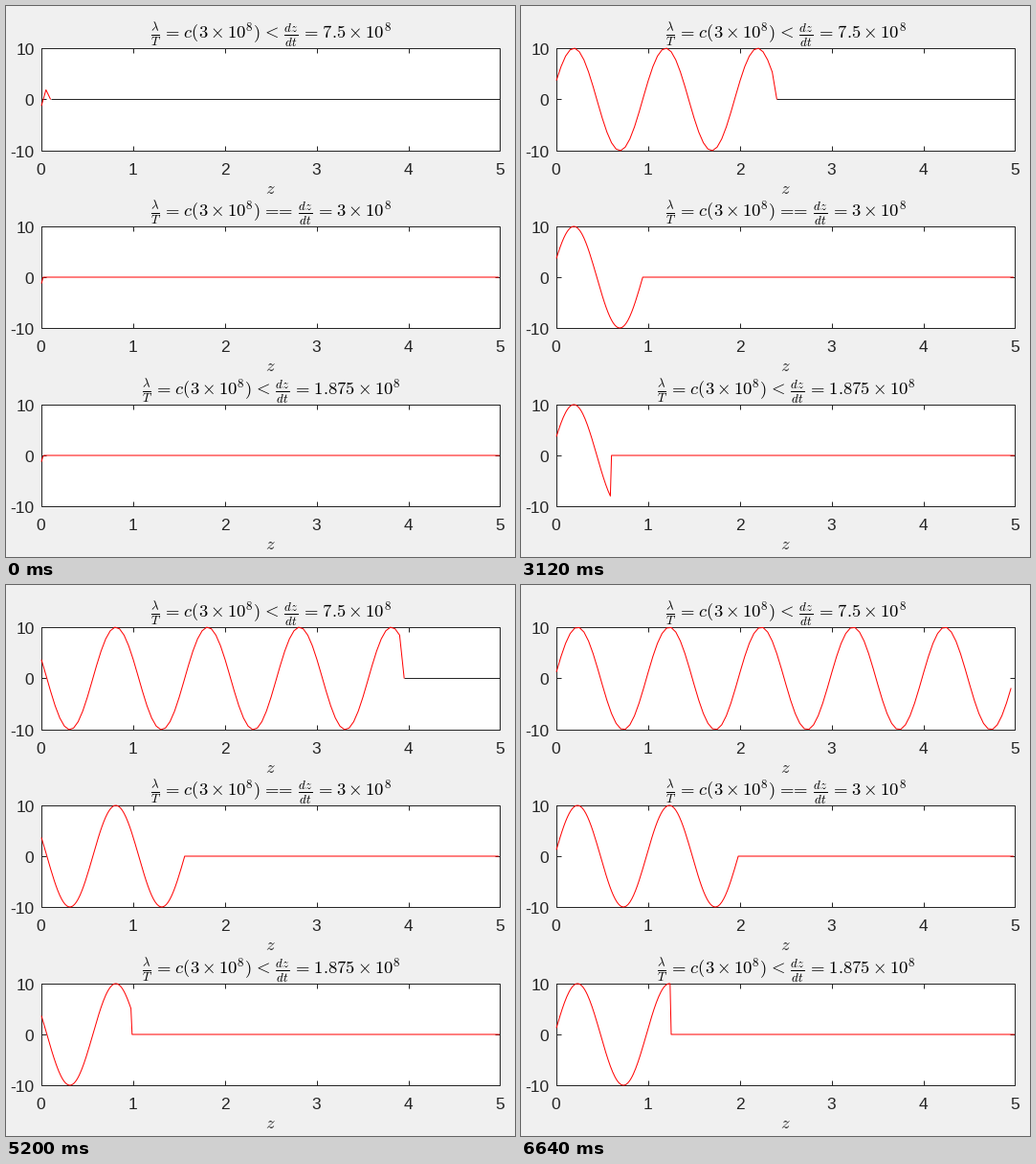
These frames come from a looping animation (532x575 px, 7.2 s). A matplotlib script:

```python
import numpy as np
import matplotlib.pyplot as plt
from matplotlib.animation import FuncAnimation

W, H, DPI = 532, 575, 100
TICK, FRAMES = 40, 180          # ms per frame, frames per loop
X0, UNIT = 37, 96               # pixel of z = 0, pixels per unit of z
LEFT, RIGHT = 37, 516
INK = (0.15, 0.15, 0.15)
PX = 72 / DPI                   # points per pixel

plt.rcParams["mathtext.fontset"] = "cm"
plt.rcParams["font.family"] = "Liberation Sans"

fig = plt.figure(figsize=(W / DPI, H / DPI), dpi=DPI, facecolor="#f0f0f0")
ax = fig.add_axes([0, 0, 1, 1])
ax.set(xlim=(0, W), ylim=(H, 0))
ax.axis("off")

# The wave advances in uneven beats: step number against frame number.
STEP_KNOTS = [1, 12, 13, 15, 23, 24, 34, 35, 46, 47, 57, 58,
              69, 70, 81, 82, 84, 85, 92, 93, 98]
FRAME_KNOTS = [2, 20, 22, 26, 39, 41, 58, 60, 78, 80, 97, 99,
               117, 119, 137, 139, 142, 144, 156, 158, 166]
BEATS = np.round(np.interp(np.arange(1, 99), STEP_KNOTS, FRAME_KNOTS))


def segment(xs, ys, color=INK, z=2):
    """One-pixel line; straight ones snap to the pixel at whole coordinates."""
    return ax.plot(xs, ys, color=color, lw=PX, zorder=z,
                   solid_capstyle="butt", solid_joinstyle="round")[0]


def label(x, y, text, size=17.4, ha="center", color=INK):
    ax.text(x, y, text, fontsize=size * PX, ha=ha, va="baseline", color=color)


def title(relation, speed):
    gap, pad = r"\hspace{0.078}", r"\hspace{0.09}"

    def rel(sign):
        return gap + sign + gap

    return (r"$\frac{\lambda}{T}" + pad + rel("=") + r"c(3\times 10^8)"
            + rel(relation) + pad + r"\frac{dz}{dt}" + pad + rel("=")
            + speed + r"\times 10^8$")


class Panel:
    def __init__(self, top, bottom, dz, count, heading, dark_rest=False):
        self.mid, self.amp = (top + bottom) / 2, (bottom - top) / 2
        self.zero = (top + bottom) // 2
        self.dark_rest = dark_rest
        self.z = np.arange(count) * dz
        self.frame(top, bottom)
        for i in range(6):
            label(X0 - 0.5 + UNIT * i, bottom + 25, str(i))
        for y, text in ((top, "10"), (self.zero, "0"), (bottom, "-10")):
            label(29.5, y + 7, text, ha="right")
        label(277, top - 10, heading, 18.6, color="black")
        label(276.5, bottom + 45, "$z$", 18.6)
        self.rest = segment([], [], INK, 3)
        self.wave = segment([], [], "red", 4)

    def frame(self, top, bottom):
        xs = [LEFT, RIGHT, RIGHT, LEFT, LEFT]
        ys = [top, top, bottom, bottom, top]
        ax.fill(xs, ys, color="white", lw=0, zorder=1)
        segment(xs, ys)
        for i in range(1, 5):
            x = X0 + UNIT * i
            segment([x, x], [top, top + 5])
            segment([x, x], [bottom, bottom - 5])
        for x in (LEFT, RIGHT - 5):
            segment([x, x + 5], [self.zero, self.zero])

    def update(self, n):
        index = np.arange(len(self.z))
        field = np.where(index <= n, np.sin(2 * np.pi * (self.z - 0.02 * n)), 0)
        x, y = X0 + UNIT * self.z, self.mid - self.amp * field
        end = n + 2 if self.dark_rest else len(x)
        self.wave.set_data(x[:end], y[:end])
        if self.dark_rest:
            rest = x[n + 1:]
            self.rest.set_data(rest, np.full(len(rest), self.zero))


panels = [
    Panel(44, 151, 0.05, 100, title("<", "7.5"), dark_rest=True),
    Panel(230, 336, 0.02, 250, title(r"=\hspace{-0.4}=", "3")),
    Panel(416, 522, 0.0125, 400, title("<", "1.875")),
]


def update(i):
    n = 1 + int(np.searchsorted(BEATS, i, side="right"))
    for panel in panels:
        panel.update(n)
    return [line for p in panels for line in (p.rest, p.wave)]


anim = FuncAnimation(fig, update, frames=FRAMES, interval=TICK,
                     repeat=True, repeat_delay=0, blit=False)
plt.show()
```
